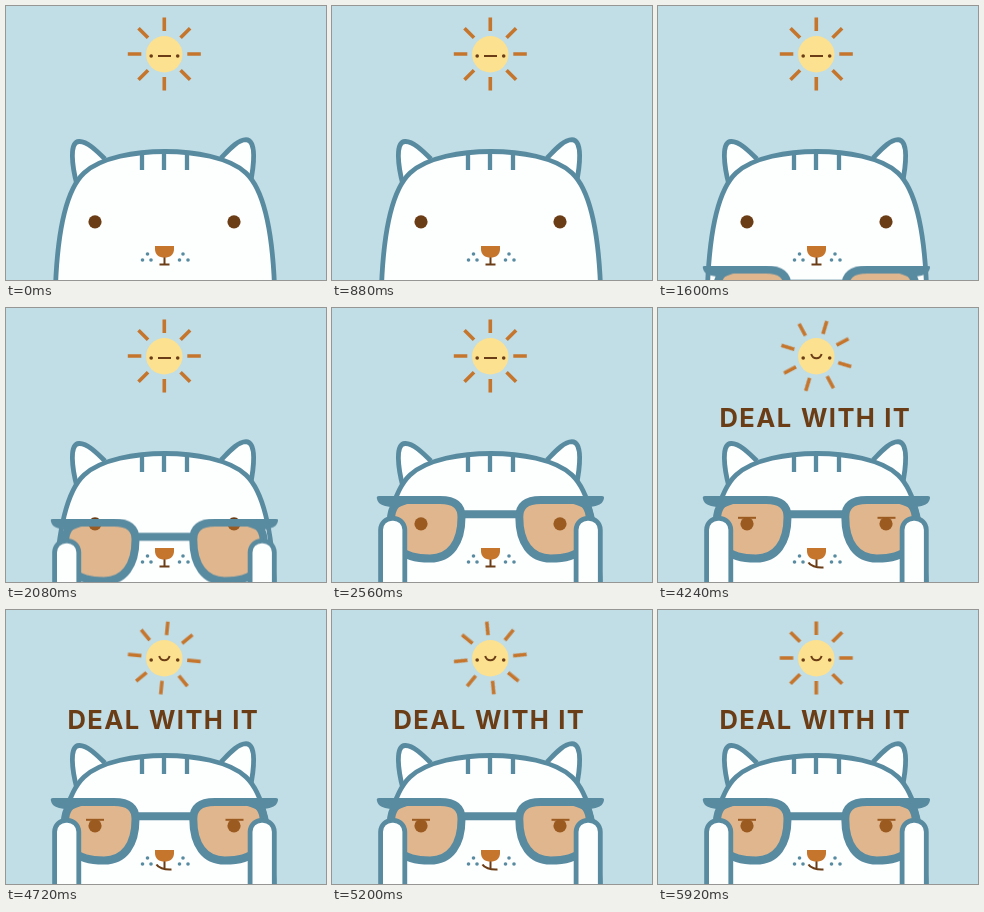
These frames come from a looping animation (320x274 px, 6 s). An HTML page:

```html
<!DOCTYPE html>
<html lang="en">
<head>
<meta charset="utf-8">
<title>Deal with it</title>
<style>
  html, body { margin: 0; width: 100%; height: 100%; overflow: hidden; background: #c1dde5; }
  svg { display: block; width: 100%; height: 100%; }

  .blue { fill: #598ba0; }
  .brown { fill: #6b3d16; }
  .coat { fill: #fdfefe; stroke: #598ba0; stroke-width: 4.8; stroke-linejoin: round; }
  .line { fill: none; stroke: #6b3d16; stroke-width: 2; }
  .frame { fill: none; stroke: #598ba0; stroke-width: 8; stroke-linejoin: round; }
  .lens { fill: #c7762a; fill-opacity: .53; }
  text { font: 700 25.5px Inter, "Open Sans", sans-serif; letter-spacing: 1.4px; }

  .rays, .glasses, .lid, .before, .after { animation: 6s linear infinite; }
  .rays { animation-name: spin; transform-origin: 158.3px 48px; }
  .glasses { animation-name: rise; }
  .lid { animation-name: squint; transform-box: fill-box; transform-origin: center; }
  .before { animation-name: leave; }
  .after { animation-name: enter; }

  @keyframes spin {
    0% { transform: rotate(0); }
    55.9% { transform: rotate(0); animation-timing-function: steps(32); }
    98.5667%, 100% { transform: rotate(180deg); }
  }
  @keyframes rise {
    0%, 21.3333% { transform: translateY(87px); animation-timing-function: cubic-bezier(.33, 0, .67, 1); }
    41.3333%, 100% { transform: none; }
  }
  @keyframes squint {
    0%, 44% { transform: scaleX(0); animation-timing-function: ease-in-out; }
    53.3333%, 100% { transform: none; }
  }
  @keyframes leave {
    0% { opacity: 1; animation-timing-function: step-end; }
    55.9%, 100% { opacity: 0; }
  }
  @keyframes enter {
    0% { opacity: 0; animation-timing-function: step-end; }
    55.9%, 100% { opacity: 1; }
  }
</style>
</head>
<body>
<svg viewBox="0 0 320 274" preserveAspectRatio="none">
  <defs>
    <path id="rayPair" d="M158.3 11.5V25M158.3 71V84.5"/>
    <g id="whiskers" class="blue">
      <circle cx="141.5" cy="248" r="1.8"/>
      <circle cx="136.5" cy="254" r="1.8"/>
      <circle cx="145" cy="254" r="1.8"/>
    </g>
    <path id="rim" d="M76 192H108C124 192 129.5 199 129.5 209C129.5 235 118 250.5 98 250.5C68 250.5 59 239 59 212C59 200 64 192 76 192Z"/>
    <g id="glass">
      <use href="#rim" class="lens"/>
      <use href="#rim" class="frame"/>
      <path class="blue" d="M47 188H80V194L62 201C59 197 47 200 45 191Q44 188 47 188Z"/>
    </g>
    <rect id="paw" class="coat" x="48.6" y="210.3" width="24.2" height="100" rx="11.5"/>
  </defs>

  <!-- sun -->
  <g class="rays" stroke="#c5752c" stroke-width="3.6">
    <use href="#rayPair"/>
    <use href="#rayPair" transform="rotate(45 158.3 48)"/>
    <use href="#rayPair" transform="rotate(90 158.3 48)"/>
    <use href="#rayPair" transform="rotate(135 158.3 48)"/>
  </g>
  <circle cx="158.3" cy="48.3" r="18.2" fill="#fce190"/>
  <g class="brown">
    <circle cx="145.2" cy="50" r="1.8"/>
    <circle cx="171.7" cy="50" r="1.8"/>
  </g>
  <path class="line before" d="M152 50H165"/>
  <path class="line after" d="M153.2 46C154.8 51.7 162 51.7 163.6 46"/>

  <text class="brown after" y="119.3"><tspan x="61.5">DEAL</tspan><tspan x="143">WITH</tspan><tspan x="226.2">IT</tspan></text>

  <!-- cat -->
  <path class="coat" d="M71 179C66 160 63 136 73 135.5C81 135 91 145 99 153"/>
  <path class="coat" d="M244 179C248 160 251 134 240 133.7C231 134 222 145 215 152"/>
  <path class="coat" d="M49.5 280C52 217 62 182 78 167C95 151 130 145.5 159 145.5S223 151 240 167C256 182 266 217 268.5 280Z"/>
  <path d="M136 146V164M158 146V164M181 146V164" stroke="#598ba0" stroke-width="4.3"/>
  <g class="brown">
    <circle cx="89" cy="215.8" r="6.6"/>
    <circle cx="228" cy="215.8" r="6.6"/>
  </g>
  <path class="line lid" d="M80 209.8H98"/>
  <path class="line lid" d="M219.5 209.8H237.5"/>
  <use href="#whiskers"/>
  <use href="#whiskers" transform="matrix(-1 0 0 1 318.5 0)"/>
  <path class="line" d="M158.5 250V258.5"/>
  <path class="line before" d="M153.5 258.5H163.5"/>
  <path class="line after" d="M150.5 254.5C152 257.5 158 260 165.5 259.5"/>
  <path fill="#c5752c" d="M149 240H168V243C168 249 164 251.5 158.5 251.5S149 249 149 243Z"/>

  <g class="glasses">
    <use href="#glass"/>
    <use href="#glass" transform="matrix(-1 0 0 1 316.8 0)"/>
    <path class="frame" d="M130 206.2H187"/>
    <use href="#paw"/>
    <use href="#paw" transform="translate(195.5)"/>
  </g>
</svg>
</body>
</html>
```
